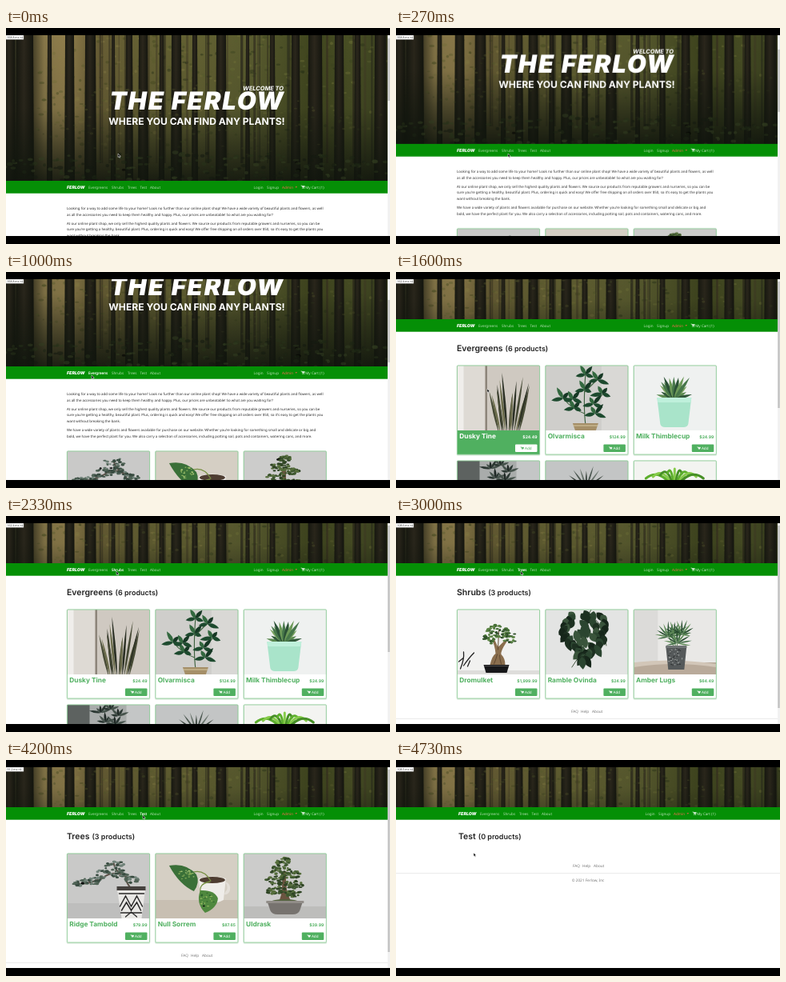
An HTML page for the animation above (4870 ms loop, 480x270 px).

```html
<!DOCTYPE html>
<html lang="en">
<head>
<meta charset="utf-8">
<title>Plant shop tour</title>
<style>
  html, body { margin: 0; width: 100%; height: 100%; overflow: hidden; background: #000; }
  svg { display: block; }
  #stage { width: 480px; height: 270px; }
  text { font-family: "Noto Sans", sans-serif; text-rendering: geometricPrecision; white-space: pre; }
  .head { font-family: Inter, sans-serif; }
  .page { opacity: 0; }
</style>
</head>
<body>
<svg id="stage" viewBox="0 0 480 270"></svg>
<script>
const LOOP = 4870;
const GREEN = '#50b060';
const stage = document.getElementById('stage');

let seed = 11;
const rnd = (a = 0, b = 1) => {
  seed = seed * 16807 % 2147483647;
  return +(a + (b - a) * seed / 2147483647).toFixed(2);
};
const pick = list => list[Math.floor(rnd() * list.length)];
const many = (n, fn) => Array.from({ length: n }, (_, i) => fn(i)).join('');

// Basic shapes
const rect = (x, y, w, h, fill, more = '') =>
  `<rect x="${x}" y="${y}" width="${w}" height="${h}" fill="${fill}" ${more}/>`;
const path = (d, fill, more = '') => `<path d="${d}" fill="${fill}" ${more}/>`;
const line = (d, color, width = 1, more = '') =>
  path(d, 'none', `stroke="${color}" stroke-width="${width}" stroke-linecap="round" ${more}`);
const oval = (x, y, rx, ry, fill, more = '') =>
  `<ellipse cx="${x}" cy="${y}" rx="${rx}" ry="${ry}" fill="${fill}" ${more}/>`;
const text = (x, y, size, fill, str, more = '') =>
  `<text x="${x}" y="${y}" font-size="${size}" fill="${fill}" ${more}>${str}</text>`;
const leaf = (x, y, len, w, angle, fill) =>
  path(`M0 0Q${len * .4} ${-w} ${len} 0Q${len * .4} ${w} 0 0`, fill,
    `transform="translate(${x} ${y}) rotate(${angle})"`);
const clump = (x, y, rx, ry, n, size, colors, more = '') => many(n, () => {
  const a = rnd(0, 6.283), d = Math.sqrt(rnd());
  return oval((x + rx * d * Math.cos(a)).toFixed(1), (y + ry * d * Math.sin(a)).toFixed(1),
    rnd(size * .6, size * 1.3), rnd(size * .4, size * .8), pick(colors), more);
});
const fan = (x, y, n, from, to, min, max, w, colors) => many(n, i =>
  leaf(x, y, rnd(min, max), w, from + (to - from) * i / (n - 1), colors[i % colors.length]));
const gradient = (id, stops, vertical) =>
  `<linearGradient id="${id}" x2="${vertical ? 0 : 1}" y2="${vertical ? 1 : 0}">` +
  stops.map(([at, c, o = 1]) => `<stop offset="${at}" stop-color="${c}" stop-opacity="${o}"/>`).join('') +
  '</linearGradient>';

// Plant pictures, 103 x 81
const DARK = ['#1d3021', '#2b4530', '#39543b', '#16261a'];
const MID = ['#2f4f2a', '#466f36', '#5f8648'];

const art = {
  snake: () => rect(0, 0, 103, 81, '#cfc9c1') + rect(0, 0, 35, 81, '#dedad4') + rect(0, 0, 8, 81, '#f0eeeb') +
    rect(35, 0, 2.5, 81, '#8d857a') +
    many(13, i => leaf(52 + i * 2.1, 84, rnd(42, 76), 2.8, -103 + i * 2.4 + rnd(-4, 4),
      ['#454934', '#6b6c4b', '#2b3024'][i % 3])),
  bushy: () => rect(0, 0, 103, 81, '#cfcecb') + rect(70, 0, 33, 81, '#d9d8d5') +
    line('M50 74Q47 50 50 10M49 60Q34 55 22 41M49 50Q63 48 73 34M49 33L66 16', '#3b5f3c', 1.1) +
    [[50, 11], [65, 18], [71, 35], [22, 41], [36, 53], [60, 48], [49, 30], [34, 42], [62, 60]]
      .map(([x, y]) => fan(x, y, 4, -190, 20, 9, 16, 5, ['#1d4a2e', '#33683f', '#163824'])).join('') +
    path('M34 72H66L63 81H37Z', '#a58f68') + line('M35 75H65', '#d8c9a0', 1.2),
  aloe: () => rect(0, 0, 103, 81, '#eff1f0') +
    fan(50, 42, 11, -165, -15, 18, 27, 4, ['#5b8a50', '#31583a', '#7aa35f']) +
    fan(50, 43, 7, -125, -55, 26, 36, 4.5, ['#47774a', '#2b5036', '#6d9a58']) +
    path('M29 40H72L68 73Q67 77 62 77H39Q34 77 33 73Z', '#a9e4ca') +
    path('M29 40H72L71 46H30Z', '#bff0db'),
  ficus: () => rect(0, 0, 103, 81, '#f1f1f0') + rect(0, 76, 103, 5, '#dedddb') +
    line('M4 74Q9 62 8 53M8 70Q15 60 21 54M13 71L16 64M2 65L7 61', '#222', 1.3) +
    path('M41 69Q44 57 48 55Q47 44 43 37L46 36L51 47L60 38L62 40Q54 52 55 56Q60 61 60 69Z', '#8a6e4e') +
    line('M46 68Q49 61 50 56M55 68Q53 61 53 57M51 50L52 26', '#5f4730', 1) +
    clump(51, 27, 14, 8, 42, 2.2, MID) + clump(66, 35, 10, 7, 26, 2.2, MID) +
    clump(40, 37, 8, 6, 20, 2.2, MID) +
    path('M33 69H65L62 79H36Z', '#171719') + rect(34, 70, 30, 1, '#4b4b4d'),
  vine: () => rect(0, 0, 103, 81, '#e3e4e3') +
    line('M57 0Q48 14 50 30T33 72M53 8Q72 12 76 45', '#354832', .9) +
    many(62, i => leaf(48 + 27 * Math.sin(i * 2.4) * Math.sin(.7 + i / 24), 1 + i * .95,
      rnd(11, 18), 9, rnd(40, 135), DARK[i % 4])),
  palm: () => rect(0, 0, 103, 81, '#e9e8e6') + rect(0, 0, 30, 66, '#dcdbd9') +
    rect(0, 66, 103, 15, '#b9aa9a') + path('M0 66Q50 60 103 68V72Q50 64 0 72Z', '#d2c6b8') +
    line('M52 48L50 24M53 48L60 25M51 48L41 29', '#4a7440', .9) +
    [[51, 30], [60, 31], [43, 34], [54, 42]].map(([x, y]) =>
      fan(x, y, 11, -190, 10, 11, 20, 1.8, ['#3d6a41', '#5d8a56', '#284d30'])).join('') +
    path('M40 46H66L63 75H43Z', '#55595a') + clump(52, 60, 9, 12, 46, 1.1, ['#8f9392', '#2e3233']) +
    rect(40, 45, 26, 3, '#707475'),
  juniper: () => rect(0, 0, 103, 81, '#c9c9c8') + rect(0, 62, 103, 19, '#bebebd') +
    line('M80 44Q72 34 74 29Q58 20 45 30Q28 38 14 38M70 28Q60 22 58 12', '#5c5148', 2) +
    [[16, 37, 9, 4], [31, 34, 10, 5], [45, 27, 11, 7], [58, 15, 13, 7], [66, 25, 11, 5], [80, 33, 10, 4]]
      .map(([x, y, rx, ry]) => clump(x, y, rx, ry, 24, 2.2, ['#506356', '#384b40', '#71837a'])).join('') +
    path('M62 42H98L93 81H68Z', '#e9e8e5') + rect(62, 41, 36, 5, '#45413e') +
    line('M65 50H96M66 66L73 53L80 66L87 53L94 66M68 71L74 61L80 71L87 61L92 71M67 74H93', '#2a2929', 1.5) +
    line('M73 79L80 73L87 79', '#2a2929', 1.3),
  cup: () => rect(0, 0, 103, 81, '#d5cfc4') + rect(0, 58, 103, 23, '#c8bfb2') +
    path('M54 31Q70 26 88 31L85 58Q70 66 57 58Z', '#efede9') + oval(71, 33, 16, 4, '#4e3d31') +
    path('M87 35Q95 38 93 46Q91 52 86 51L87 48Q91 45 89 39Z', '#e3dfd8') +
    line('M69 34Q60 18 44 24M68 35Q51 38 58 53', '#789044', 1.3) +
    path('M17 15Q38 11 51 26Q56 36 48 47Q30 39 17 15Z', '#3a7038') +
    path('M56 46Q74 45 78 56Q77 68 62 74Q50 62 56 46Z', '#4f883e') +
    clump(38, 27, 10, 7, 22, 1.2, ['#87ad59', '#aac878']) + clump(64, 58, 9, 9, 20, 1.3, ['#94b960', '#2e632e']),
  pine: () => rect(0, 0, 103, 81, '#cccccb') + rect(0, 66, 103, 15, '#bdbdbb') +
    path('M44 60Q50 45 47 22H53Q51 46 59 60Z', '#6b5440') +
    [[50, 10, 9, 5], [45, 20, 13, 6], [58, 26, 12, 5], [42, 34, 14, 6], [62, 39, 12, 5], [40, 46, 12, 5], [61, 50, 11, 4]]
      .map(([x, y, rx, ry]) => clump(x, y, rx, ry, 30, 2.2, ['#3e572f', '#566e3c', '#2f4425'])).join('') +
    oval(51, 60, 17, 3, '#55623f') +
    path('M29 59H74L70 71Q68 76 61 76H42Q35 76 33 71Z', '#77736f') + rect(28, 59, 47, 3, '#918d88'),
  sprig: () => rect(0, 0, 103, 81, '#a9acab') + rect(0, 0, 28, 81, '#5d6260') + rect(74, 0, 29, 81, '#c4c6c6') +
    [[42, 10], [54, 6], [64, 14], [48, 22], [60, 25]].map(([x, y]) =>
      fan(x, y, 5, -170, -20, 8, 15, 3, ['#2c3833', '#46534c', '#1f2825'])).join(''),
  frond: () => rect(0, 0, 103, 81, '#c3c5c5') +
    fan(51, 34, 11, -180, 0, 20, 32, 2, ['#4b5750', '#68736b', '#39443d']),
  fern: () => rect(0, 0, 103, 81, '#f3f4f1') +
    many(9, i => {
      const dx = (i - 4) * 9, top = 4 + Math.abs(i - 4) * 2;
      return line(`M51 36Q${51 + dx * .5} ${top - 4} ${51 + dx} ${top + 10}`,
        ['#5cae2c', '#86cb4a', '#468f26'][i % 3], 3);
    }),
};

// Woodland banner, shared by every page: [x, width] of the main trunks
const TRUNKS = [[-2, 13], [13, 21], [52, 5], [74, 11], [99, 13], [132, 4], [150, 8], [166, 11], [192, 5], [207, 12],
  [233, 6], [263, 12], [300, 4], [330, 6], [357, 10], [378, 17], [411, 11], [436, 7], [461, 14]];
const LIGHT = ['#7d773d', '#94884a', '#5f6230', '#44491f'];

const wood = () => rect(0, 0, 480, 182, 'url(#glow)') +
  clump(150, 70, 120, 75, 200, 2.6, LIGHT, 'opacity=".4"') +
  clump(330, 60, 160, 75, 260, 2.6, ['#5d6330', '#787a3c', '#3f4722', '#2b3219'], 'opacity=".45"') +
  many(46, () => rect(rnd(95, 476), 0, rnd(1, 3.5), 160, pick(['#2f2b1c', '#423a26', '#20211a']), 'opacity=".5"')) +
  TRUNKS.map(([x, w]) => path(`M${x} 0h${w}l1 182h${-w - 2}z`, 'url(#bark)')).join('') +
  clump(250, 105, 220, 50, 200, 2, ['#5a6230', '#3b4520', '#6f7239'], 'opacity=".3"') +
  rect(0, 0, 480, 182, 'url(#dusk)') +
  clump(240, 166, 260, 20, 240, 3, ['#1c2414', '#27311a', '#323c20', '#141a10'], 'opacity=".55"');

const bigWood = () => '<use href="#wood" y="9"/>' +
  text(347, 78, 7.4, '#fff', 'WELCOME TO', 'class="head" font-weight="700" font-style="italic" text-anchor="end"') +
  text(239, 102, 31, '#fff', 'THE FERLOW',
    'class="head" font-weight="900" font-style="italic" text-anchor="middle" letter-spacing="1.8"') +
  text(238.5, 121, 12.1, '#fff', 'WHERE YOU CAN FIND ANY PLANTS!',
    'class="head" font-weight="700" text-anchor="middle"');
const slimWood = () => '<svg y="9" width="480" height="50" viewBox="0 66 480 50"><use href="#wood"/></svg>';

// Page parts
const cartIcon = (x, y, fill, size = 1) => `<g transform="translate(${x} ${y}) scale(${size})">` +
  line('M0 0h.8l.8 2.2h2.2l.5-1.6h-3', fill, .7) + path('M1 .5h3.4l-.6 1.8h-2.2z', fill) +
  oval(1.8, 3.4, .5, .5, fill) + oval(3.4, 3.4, .5, .5, fill) + '</g>';

const LINKS = [['Evergreens', 103], ['Shrubs', 132], ['Trees', 152], ['Test', 167.5], ['About', 180]];
const nav = (y, hot = '', dx = 0) => {
  const item = (x, str, fill = '#b4deb2', more = '') => text(x, y + 9.6, 4.6, fill, str, `font-weight="500" ${more}`);
  return rect(0, y, 480, 15.7, '#058f06') + `<g transform="translate(${dx} 0)">` +
    text(76, y + 9.7, 5.3, '#fff', 'FERLOW', 'class="head" font-weight="900" font-style="italic"') +
    LINKS.map(([name, x]) => item(x, name) +
      (name === hot ? item(x, name, '#fff', `class="hot" data-link="${name}"`) : '')).join('') +
    item(309.5, 'Login') + item(326, 'Signup') + item(345, 'Admin', '#f0694f') +
    path(`M361.5 ${y + 7.2}h2.6l-1.3 1.5z`, '#f0694f') +
    cartIcon(369, y + 6, '#d9f0d8') + item(374.2, 'My Cart (1)', '#c9e8c8') + '</g>';
};

const cardBody = (x, y, name, price, ink, paper, id = '') =>
  `<g id="${id}">` + rect(x, y + 81, 103, 30, paper) +
  text(x + 2.8, y + 91.4, 8.3, ink, name, 'class="head" font-weight="700"') +
  text(x + 100, y + 90.8, 5.1, ink, price, 'class="head" font-weight="700" text-anchor="end"') +
  rect(x + 72.5, y + 98.5, 27.5, 9.5, ink, 'rx="1"') + cartIcon(x + 79.5, y + 101.8, paper, .85) +
  text(x + 84.6, y + 105, 4.6, paper, 'Add', 'font-weight="500"') + '</g>';
const card = (x, y, [kind, name, price], over) =>
  rect(x - .8, y - .5, 104.6, 113, '#cfe5d2', 'rx="1.5"') +
  `<svg x="${x}" y="${y}" width="103" height="81">${art[kind]()}</svg>` +
  cardBody(x, y, name, price, GREEN, '#fff') +
  (over ? cardBody(x, y, name, price, '#fff', GREEN, 'over') : '') +
  rect(x, y, 103, 111, 'none', 'stroke="#8ccb96" stroke-width=".8" rx="1"');
const row = (y, items, over) => items.map((it, i) => card(76.5 + 110.4 * i, y, it, over && !i)).join('');

const title = (name, count, x = 76) =>
  `<text class="head" x="${x}" y="99.3" font-size="10.5" font-weight="600" fill="#222">${name}` +
  `<tspan dx="3" font-size="9">(${count} products)</tspan></text>`;
const footer = (y, dx = 0) => {
  const item = (x, str) => text(x + dx, y, 4.7, '#777', str);
  return item(219, 'FAQ') + item(231, 'Help') + item(245, 'About') +
    rect(0, y + 7.6, 480, .6, '#dedede') +
    text(240, y + 18.2, 4.7, '#777', '© 2021 Ferlow, Inc', 'text-anchor="middle"');
};
const bar = (y, h) => rect(477, 9, 3, 252, '#f1f1f1') + rect(477.3, y, 2.4, h, '#c2c2c2');
const badge = ms => rect(0, 9, 22, 5.2, '#fff', 'stroke="#aaa" stroke-width=".4"') +
  text(1.5, 13, 3.5, '#333', `${ms} ms ×4`);

const STORY = [
  [227.2, 'Looking for a way to add some life to your home? Look no further than our online plant shop! We have a wide variety of beautiful plants and flowers, as well'],
  [234.5, 'as all the accessories you need to keep them healthy and happy. Plus, our prices are unbeatable! So what are you waiting for?'],
  [246, 'At our online plant shop, we only sell the highest quality plants and flowers. We source our products from reputable growers and nurseries, so you can be'],
  [253.4, 'sure you’re getting a healthy, beautiful plant. Plus, ordering is quick and easy! We offer free shipping on all orders over $50, so it’s easy to get the plants you'],
  [260.7, 'want without breaking the bank.'],
  [272.3, 'We have a wide variety of plants and flowers available for purchase on our website. Whether you’re looking for something small and delicate or big and'],
  [279.6, 'bold, we have the perfect plant for you. We also carry a selection of accessories, including potting soil, pots and containers, watering cans, and more.'],
];
const EVERGREENS = [['snake', 'Dusky Tine', '$24.49'], ['bushy', 'Olvarmisca', '$124.99'], ['aloe', 'Milk Thimblecup', '$24.99']];
const MORE = [['sprig', '', ''], ['frond', '', ''], ['fern', '', '']];
const SHRUBS = [['ficus', 'Dromulket', '$1,999.99'], ['vine', 'Ramble Ovinda', '$24.99'], ['palm', 'Amber Lugs', '$64.49']];
const TREES = [['juniper', 'Ridge Tambold', '$79.99'], ['cup', 'Null Sorrem', '$87.65'], ['pine', 'Uldrask', '$39.99']];

const page = body => `<g class="page">${rect(0, 9, 480, 252, '#fff')}${body}</g>`;
const shop = (name, count, hot, rows, foot, dx = 0) =>
  slimWood() + nav(59, hot, dx) + title(name, count, 76 + dx) + rows + (foot ? footer(foot, dx) : '');

stage.innerHTML = '<defs>' +
  gradient('glow', [[0, '#23261a'], [.07, '#4a4329'], [.1, '#8d7c4c'], [.16, '#97834f'], [.23, '#6d6137'],
    [.35, '#696435'], [.5, '#666434'], [.65, '#5c5e30'], [.8, '#42481f'], [.9, '#4c5226'], [1, '#3b411f']]) +
  gradient('dusk', [[0, '#12170e', .05], [.5, '#12170e', .15], [.75, '#12170e', .55], [1, '#10150d', .9]], true) +
  gradient('bark', [[0, '#15160f'], [.45, '#2d281d'], [1, '#12130d']]) +
  `<g id="wood">${wood()}</g></defs>` +
  page('<g id="scroll">' + bigWood() + nav(191, 'Evergreens') +
    STORY.map(([y, s]) => text(76, y, 4.4, '#2b2b2b', s)).join('') + row(297, TREES) + '</g>' +
    rect(477, 9, 3, 252, '#f1f1f1') + '<g id="thumb">' + rect(477.3, 13, 2.4, 78, '#c2c2c2') + '</g>' + badge('358.8')) +
  page(shop('Evergreens', 6, 'Shrubs', row(117, EVERGREENS, true) + row(236, MORE)) + bar(12, 158) + badge('162.4')) +
  page(shop('Shrubs', 3, 'Trees', row(117, SHRUBS), 245.7) + bar(12, 228) + badge('108.6')) +
  page(shop('Trees', 3, 'Test', row(117, TREES), 245.7) + bar(12, 228) + badge('91.2')) +
  page(shop('Test', 0, '', '', 133.8, 2) + badge('108.5')) +
  rect(0, 0, 480, 9, '#000') + rect(0, 260, 480, 10, '#000') +
  '<g id="cursor">' + path('M0 0V4.6L1.1 3.6L1.9 5.3L2.7 4.9L1.9 3.3H3.3Z', '#000', 'stroke="#fff" stroke-width=".5"') + '</g>';

// Motion: steps are [time, value, easing]
function play(el, prop, steps, easing = 'linear') {
  const first = steps[0], last = steps[steps.length - 1];
  const all = [[0, first[1], first[2]], ...steps.filter(s => s[0] > 0), [LOOP, last[1]]];
  el.animate(all.map(([t, value, ease]) => ({ offset: t / LOOP, [prop]: value, easing: ease || easing })),
    { duration: LOOP, iterations: Infinity });
}
const $ = sel => stage.querySelector(sel);
const move = (x, y) => `translate(${x}px, ${y}px)`;

const CUTS = [0, 1270, 2400, 3400, 4430, LOOP];
stage.querySelectorAll('.page').forEach((el, i) => {
  const steps = [[0, i ? 0 : 1]];
  if (i) steps.push([CUTS[i], 1]);
  if (CUTS[i + 1] < LOOP) steps.push([CUTS[i + 1], 0]);
  play(el, 'opacity', steps, 'step-end');
});

const SCROLL = [[70, 0], [270, 46], [400, 68], [480, 73]];
play($('#scroll'), 'transform', SCROLL.map(([t, y]) => [t, move(0, -y)]));
play($('#thumb'), 'transform', SCROLL.map(([t, y]) => [t, move(0, y * .3)]));

play($('#cursor'), 'transform', [
  [0, 140, 157], [520, 140, 157], [900, 107, 129], [1270, 107, 129], [1500, 114, 146], [1750, 114, 146],
  [2150, 138, 69], [2600, 138, 69], [2900, 156, 69], [3700, 156, 69], [4050, 171, 69], [4470, 171, 69], [4690, 97, 116],
].map(([t, x, y]) => [t, move(x, y), 'ease-in-out']));

const HOVER = { Evergreens: 880, Shrubs: 2120, Trees: 2850, Test: 4020 };
stage.querySelectorAll('.hot').forEach(el =>
  play(el, 'opacity', [[0, 0], [HOVER[el.dataset.link], 0], [HOVER[el.dataset.link] + 80, 1]]));
play($('#over'), 'opacity', [[0, 0], [1280, 0], [1430, 1], [1880, 1], [2030, 0]]);
</script>
</body>
</html>
```
